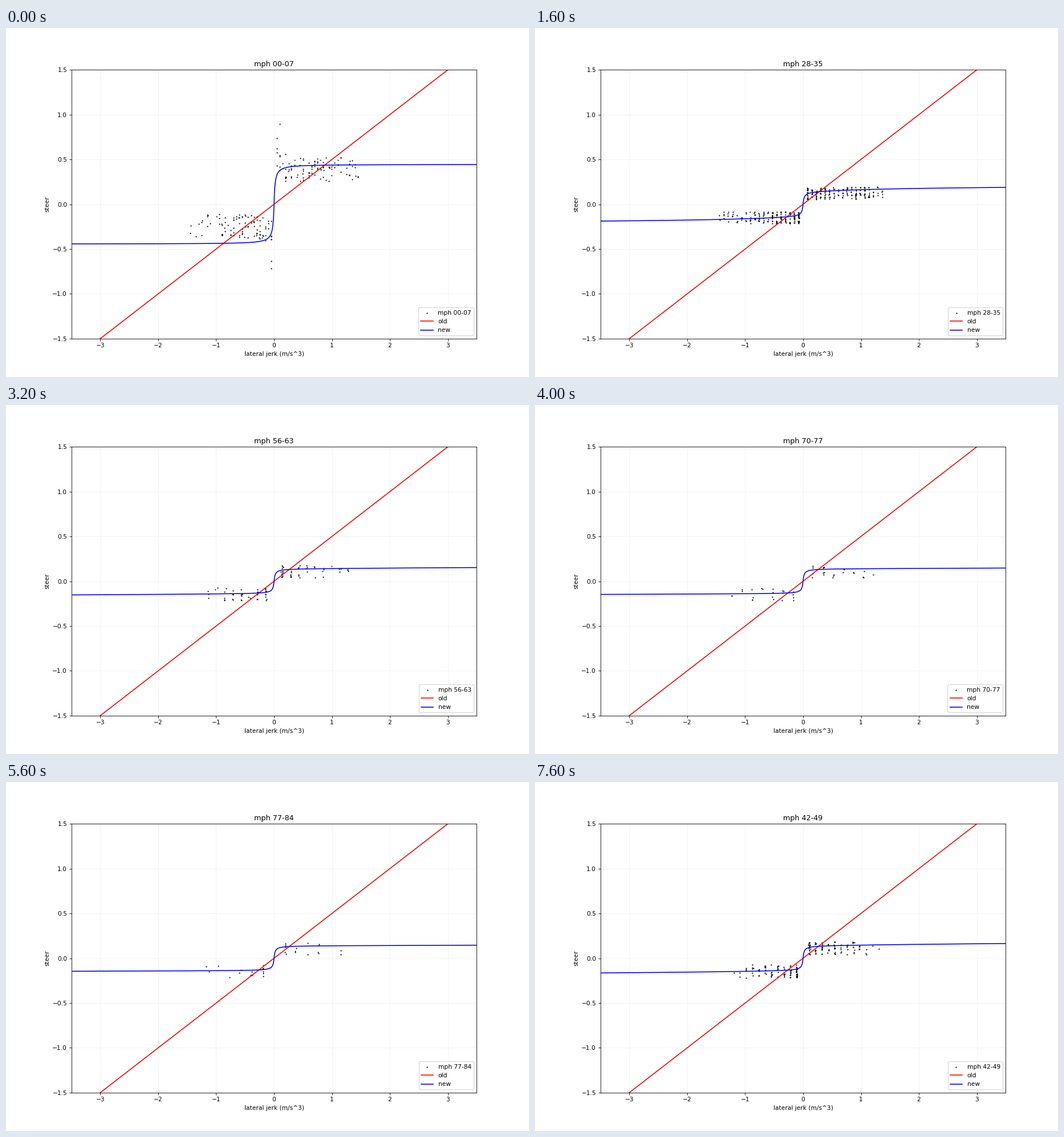
Write a matplotlib script that moves like this. It is 917 px wide and 611 px high and loops after 8000 ms.

```python
import numpy as np
import matplotlib.pyplot as plt
from matplotlib.animation import FuncAnimation

BIN_MPH = 7
BINS = 13
FRAMES = 20


def curve(x, k):
    """Sharp step at zero plus a slow rise that flattens with speed."""
    sharp = 0.139 + 0.306 * np.exp(-1.8 * k)
    slow = 0.08 * min(k / 2, 1)
    knee = 0.42 + 0.43 * (k - 2) ** 2
    return sharp * x / (0.018 + abs(x)) + slow * x / (knee + abs(x))


def side(rng, k, sign, base, lift, slope):
    """Readings on one side of zero, stacked in columns of equal jerk."""
    u = (k + 1) / 3
    count = int(8 + 222 * u * u * np.exp(2 - 2 * u))
    low = np.exp(-k)
    busy = np.exp(-(k - 2) ** 2 / 2.5)
    step = max(0.05, 0.0165 * (k + 0.6))

    reach = 1.3 + 1.2 * busy
    column = np.round(reach * rng.beta(1, 1.6, count) / step)
    x = step * (np.maximum(column, 1) + rng.normal(0, 0.06, count))

    spread = 1.8 * (0.04 + 0.04 * low - 0.018 * busy)
    y = base + lift * low + slope * busy * x + rng.uniform(-spread, spread, count)
    # Slow driving flares out near zero jerk
    y *= 1 + low * rng.exponential(0.9, count) * np.exp(-x / 0.08)
    return sign * np.column_stack((x, y))


def readings(k):
    rng = np.random.default_rng(k)
    return np.vstack((side(rng, k, 1, 0.11, 0.27, 0.05),
                      side(rng, k, -1, 0.145, 0.1, 0.015)))


points = [readings(k) for k in range(BINS)]
xs = np.linspace(-3.5, 3.5, 1001)

# 917 x 611 pixels
fig, ax = plt.subplots(figsize=(12.003, 7.998), dpi=76.4)
dots = ax.scatter([], [], s=1, color="black")
ax.plot(xs, xs / 2, "r", label="old")
new_line, = ax.plot(xs, 0 * xs, "b", label="new")
ax.set(xlim=(-3.5, 3.5), ylim=(-1.5, 1.5), xlabel="lateral jerk (m/s^3)", ylabel="steer")
ax.grid(color="#f2f2f2")


def update(i):
    # Speed climbs to the top bin, holds, then falls back
    k = min(i, 2 * BINS - 1 - i)
    name = f"mph {k * BIN_MPH:02d}-{(k + 1) * BIN_MPH:02d}"
    dots.set_offsets(points[k])
    dots.set_label(name)
    new_line.set_ydata(curve(xs, k))
    ax.set_title(name)
    ax.legend(loc="lower right")


anim = FuncAnimation(fig, update, frames=FRAMES, interval=400,
                     init_func=lambda: update(0), repeat=True, repeat_delay=0)
plt.show()
```
